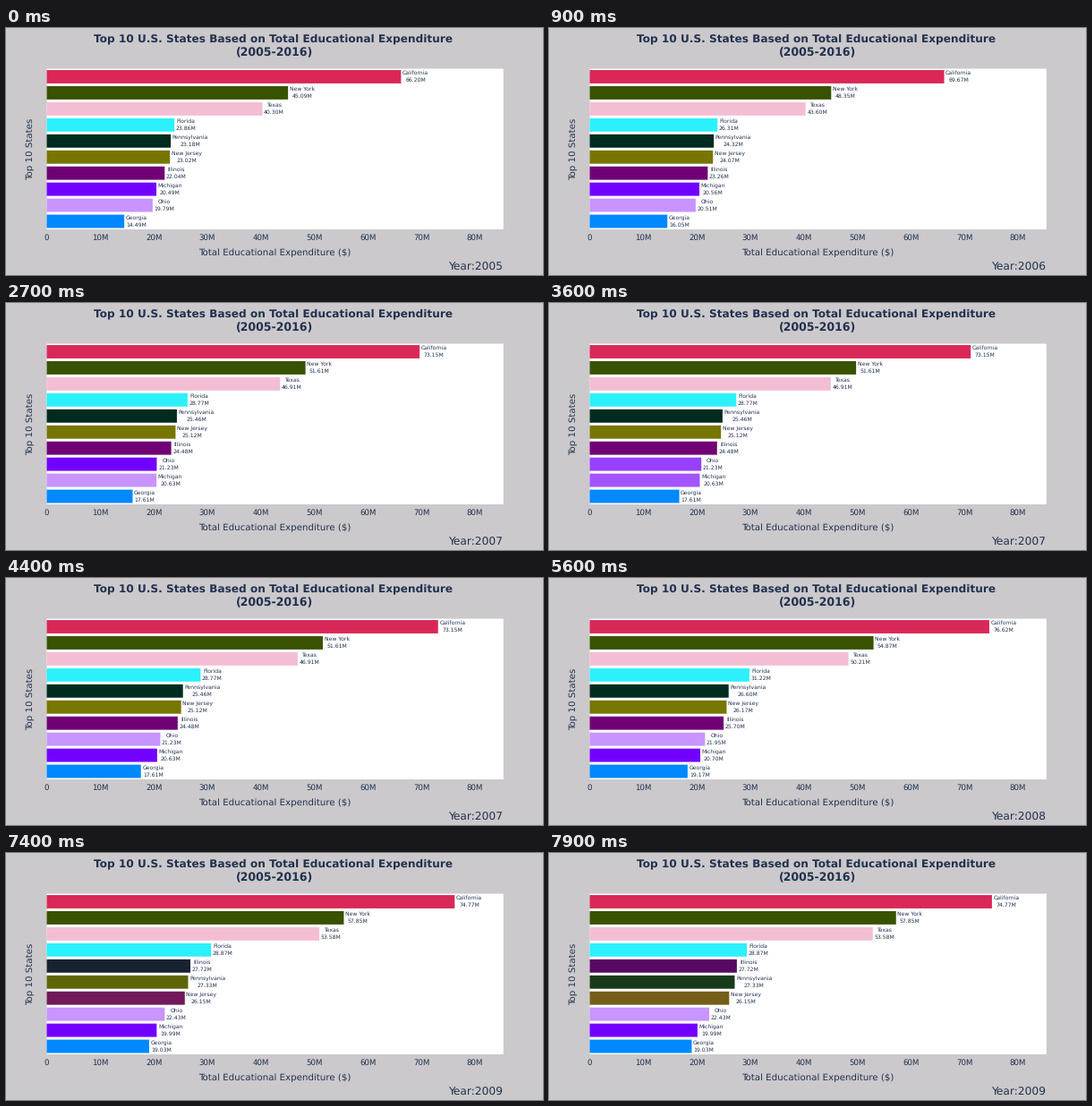
Recreate the animation shown at these times as a matplotlib script. Size 600 by 276 pixels, loop 8000 ms.

```python
import matplotlib.pyplot as plt
import numpy as np
from matplotlib.animation import FuncAnimation
from matplotlib.colors import to_rgb
from matplotlib.patches import Rectangle

plt.rcParams["text.hinting"] = "none"

W, H, DPI = 600, 276, 96
STEP, FRAMES = 100, 80
LEFT, RIGHT, TOP, BOTTOM = 45.5, 555.8, 45.5, 225
SCALE = 5.98                      # pixels per million
PITCH = (BOTTOM - TOP) / 10
BAR_H = 14.9
INK = "#22314f"
FIRST_YEAR, MORPH, LEAD = 2005, 2000, 645

# Spending in the key years; the years between grow evenly.
KEY_YEARS = [2005, 2008, 2009]
STATES = {
    "California": ("#d92857", 66.20, 76.62, 74.77),
    "New York": ("#385200", 45.09, 54.87, 57.85),
    "Texas": ("#f3bed4", 40.30, 50.21, 53.58),
    "Florida": ("#2cf0fc", 23.86, 31.22, 28.87),
    "Pennsylvania": ("#002c20", 23.18, 26.60, 27.33),
    "New Jersey": ("#767600", 23.02, 26.17, 26.15),
    "Illinois": ("#700074", 22.04, 25.70, 27.72),
    "Michigan": ("#7200ff", 20.49, 20.70, 19.99),
    "Ohio": ("#c894ff", 19.79, 21.95, 22.43),
    "Georgia": ("#0088ff", 14.49, 19.17, 19.03),
}


def ranking(year):
    """Rows of (value, name, rgb), largest first."""
    rows = [(np.interp(year, KEY_YEARS, spend), name, np.array(to_rgb(color)))
            for name, (color, *spend) in STATES.items()]
    return sorted(rows, key=lambda row: -row[0])


def ease(p):
    p = min(max(p, 0), 1)
    return 4 * p**3 if p < 0.5 else 1 - 4 * (1 - p)**3


fig = plt.figure(figsize=(W / DPI, H / DPI), dpi=DPI, facecolor="#cbc9cb")
ax = fig.add_axes([0, 0, 1, 1])
ax.set_xlim(0, W)
ax.set_ylim(H, 0)
ax.axis("off")


def box(x, y, w, h, color, z=1):
    return ax.add_patch(Rectangle((x, y), w, h, fc=color, lw=0,
                                  zorder=z, snap=False))


def text(x, y, s, px, **kw):
    kw = {"ha": "center", "va": "baseline", "color": INK, "zorder": 3,
          "family": "DejaVu Sans"} | kw
    return ax.text(x, y, s, fontsize=px * 72 / DPI, **kw)


box(LEFT, TOP, RIGHT - LEFT, BOTTOM - TOP, "white")
text(299, 15.2, "Top 10 U.S. States Based on Total Educational Expenditure",
     12.08, weight="bold")
text(300.5, 31.2, "(2005-2016)", 12.5, weight="bold")
text(300.5, 254, r"Total Educational Expenditure (\$)", 10.3)
text(27, 135.5, "Top 10 States", 10.25, rotation=90, va="center")
for tick in range(0, 90, 10):
    text(LEFT + tick * SCALE, 236.4, f"{tick}M" if tick else "0", 8.6)

year_text = text(555.5, 270.9, "", 12.3, ha="right")
bars, labels = [], []
for row in range(10):
    mid = TOP + PITCH * (row + 0.5)
    bars.append(box(LEFT, mid - BAR_H / 2, 0, BAR_H, "white", 2))
    labels.append(text(0, mid + 5.4, "", 6.15, ha="left",
                       multialignment="center", linespacing=1.36))


def draw(i):
    turn, phase = divmod(i * STEP - LEAD, MORPH)
    e = ease(phase / MORPH)
    year = FIRST_YEAR + turn + 1
    year_text.set_text(f"Year:{year}")
    rows = zip(bars, labels, ranking(year - 1), ranking(year))
    for bar, label, (start, _, c0), (value, name, c1) in rows:
        width = SCALE * (start + (value - start) * e)
        bar.set_width(width)
        bar.set_facecolor(c0 + (c1 - c0) * e)
        label.set_x(LEFT + width + 1.6)
        label.set_text(f"{name}\n{value:.2f}M")
    return [*bars, *labels, year_text]


anim = FuncAnimation(fig, draw, frames=FRAMES, interval=STEP,
                     repeat=True, repeat_delay=0)
plt.show()
```
